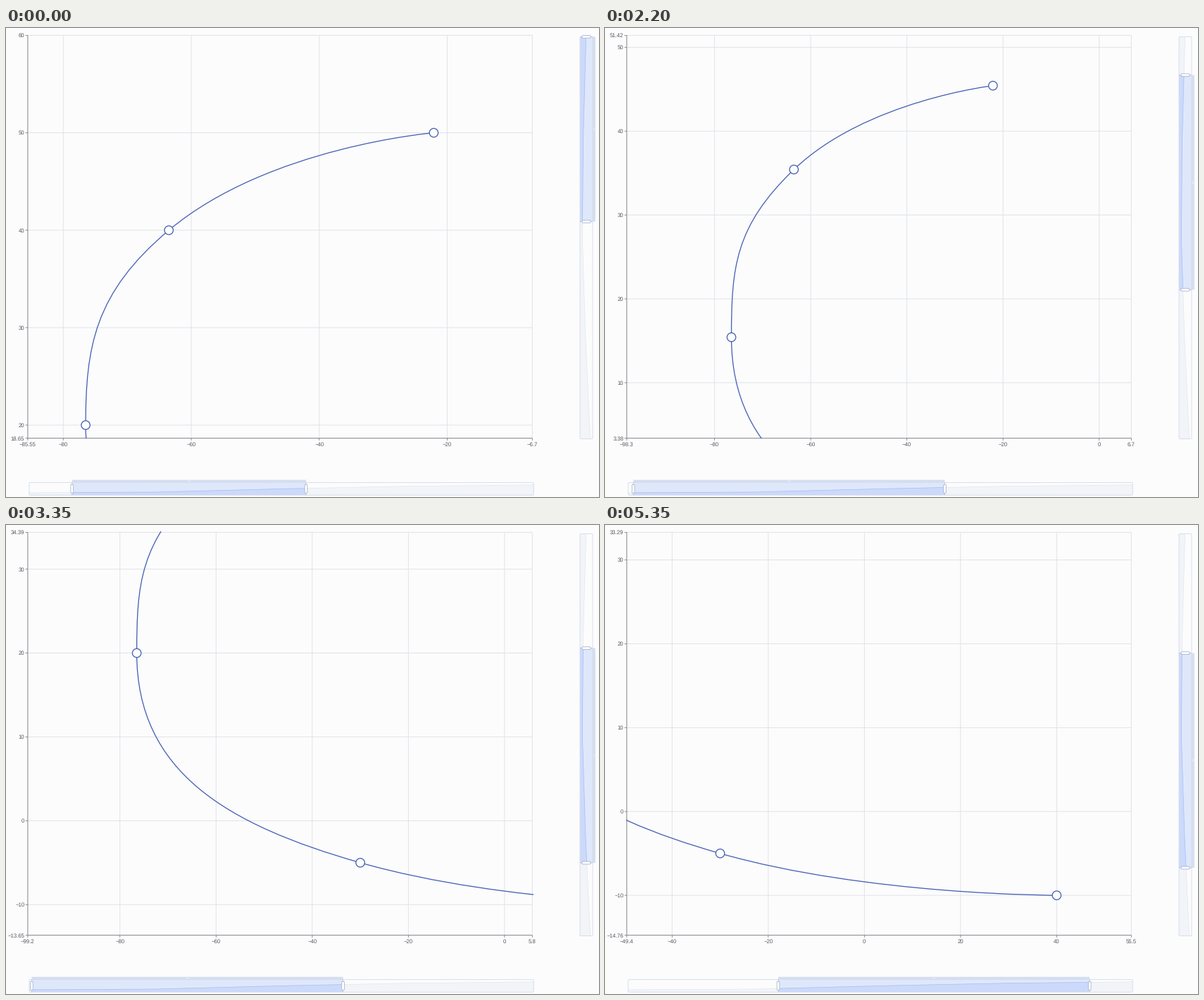
These frames come from a looping animation (842 by 665 pixels, 5400 ms). A matplotlib script:

```python
import numpy as np
import matplotlib.pyplot as plt
from matplotlib.animation import FuncAnimation
from matplotlib.patches import Circle, FancyBboxPatch, PathPatch, Polygon, Rectangle
from matplotlib.path import Path

W, H, DPI = 842, 665, 100
LOOP, STEP = 5400, 50
PX = 72 / DPI
LEFT, RIGHT, TOP, BOTTOM = 30.9, 747.3, 10.4, 581.7
BG, BLUE, GRID, AXIS = "#fcfcfc", "#4660b4", "#dee1e8", "#74767d"
FILL, SHADE, STRIP, EDGE = "#dfe8fb", "#ccd9fa", "#d5deef", "#d2dbee"
POINTS = np.array([(40, -10), (-30, -5), (-76.5, 20), (-63.5, 40), (-22.1, 50)])
X_FULL, Y_FULL = (-100, 70), (-30, 60)
LAG = 100  # the curve follows the axes by this many ms

X_KEYS = [(0, -85.55), (500, -99.17), (1700, -99.17), (2050, -98.27), (2300, -98.27),
          (2700, -98.52), (2800, -98.52), (3250, -99.17), (3750, -99.17),
          (4300, -66.42), (4850, -66.42), (5250, -49.43)]
Y_KEYS = [(0, 60), (1750, 60), (2100, 56), (2200, 51.424), (2700, 49.05), (2800, 49.05),
          (3250, 34.394), (3350, 34.394), (3600, 33.7), (3750, 33.7), (4300, 33.506),
          (4850, 33.506), (5250, 33.288)]

plt.rcParams.update({"font.family": "Liberation Sans", "text.hinting": "none",
                     "path.snap": False})
fig = plt.figure(figsize=(W / DPI, H / DPI), dpi=DPI, facecolor=BG)
ax = fig.add_axes([0, 0, 1, 1])


def track(keys, t):
    return np.interp(t, *zip(*keys))


def window(t):
    lo, top = track(X_KEYS, t), track(Y_KEYS, t)
    width = track([(0, 78.85), (500, 104.95)], t)
    height = track([(0, 41.35), (500, 48.046)], t)
    return (lo, lo + width), (top - height, top)


def scale(v, dom, a, b):
    return a + (v - dom[0]) / (dom[1] - dom[0]) * (b - a)


def line(xs, ys, color, width, z=1):
    ax.plot(xs, ys, color=color, lw=width * PX, zorder=z, solid_capstyle="butt")


def rect(x0, y0, x1, y1, color, z):
    ax.add_patch(Rectangle((x0, y0), x1 - x0, y1 - y0, fc=color, ec="none", zorder=z))


def rounded(x0, y0, x1, y1, r, face, edge, width, z):
    ax.add_patch(FancyBboxPatch((x0, y0), x1 - x0, y1 - y0, fc=face, ec=edge, lw=width * PX,
                                boxstyle=f"round,pad=0,rounding_size={r}", zorder=z))


def label(v, digits):
    s = f"{v:.{digits}f}"
    if "." in s:
        s = s.rstrip("0").rstrip(".")
    return "0" if s == "-0" else s.replace("-", "\u2212")


def text(x, y, s, ha):
    ax.text(x, y + 2.8, s, fontsize=7.8 * PX, color="#55575f", ha=ha, va="baseline", zorder=6)


def ticks(dom, step):
    inner = np.arange(np.ceil(dom[0] / step) * step, dom[1], step)
    return [dom[0], *(v for v in inner if dom[0] + 1e-6 < v < dom[1] - 1e-6), dom[1]]


def draw_axes(xd, yd):
    digits = 2 if xd[1] - xd[0] < 100 else 1
    for v in ticks(xd, 20):
        x = scale(v, xd, LEFT, RIGHT)
        if v != xd[0]:
            line([x, x], [TOP, BOTTOM], GRID, 0.9)
        line([x, x], [BOTTOM, BOTTOM + 3.2], AXIS, 0.8, 5)
        if v in xd or LEFT + 24 < x < RIGHT - 20:
            text(x, 590, label(v, digits), "center")
    for v in ticks(yd, 10):
        y = scale(v, yd, BOTTOM, TOP)
        if v != yd[0]:
            line([LEFT, RIGHT], [y, y], GRID, 0.9)
        line([LEFT - 3.2, LEFT], [y, y], AXIS, 0.8, 5)
        if v in yd or TOP + 8 < y < BOTTOM - 8:
            text(26.3, y, label(v, 2), "right")
    line([LEFT, LEFT], [TOP, BOTTOM], AXIS, 0.9, 5)
    line([LEFT, RIGHT], [BOTTOM, BOTTOM], AXIS, 0.9, 5)


def smooth_path(p, smooth=0.5):
    """Bezier spline whose handles stay inside the box of each segment."""
    verts, codes, start = [p[0]], [Path.MOVETO], p[0]
    for i in range(1, len(p)):
        prev, cur = p[i - 1], p[i]
        end = after = cur
        if i < len(p) - 1:
            nxt = p[i + 1]
            a, b = np.hypot(*(cur - prev)), np.hypot(*(nxt - cur))
            after = cur + (nxt - prev) * smooth * b / (a + b)
            after = np.clip(after, np.minimum(cur, nxt), np.maximum(cur, nxt))
            end = cur - (after - cur) * a / b
            end = np.clip(end, np.minimum(cur, prev), np.maximum(cur, prev))
            after = cur + (cur - end) * b / a
        verts += [start, end, cur]
        codes += [Path.CURVE4] * 3
        start = after
    return Path(verts, codes)


def draw_curve(xd, yd):
    p = np.column_stack([scale(POINTS[:, 0], xd, LEFT, RIGHT),
                         scale(POINTS[:, 1], yd, BOTTOM, TOP)])
    curve = PathPatch(smooth_path(p), fc="none", ec=BLUE, lw=1.3 * PX, zorder=7)
    ax.add_patch(curve)
    curve.set_clip_path(Rectangle((LEFT - 1, TOP - 1.2), RIGHT - LEFT + 2.5, BOTTOM - TOP + 1.2,
                                  transform=ax.transData))
    for x, y in p:
        if LEFT <= x <= RIGHT and TOP <= y <= BOTTOM:
            ax.add_patch(Circle((x, y), 6.2, fc="white", ec=BLUE, lw=1.3 * PX, zorder=8))


def draw_slider(dom, full, values, a, b, base, depth, vertical):
    """Zoom bar running from a to b; depth is signed, away from base."""
    def at(u, v):
        return (v, u) if vertical else (u, v)

    def box(u0, v0, u1, v1):
        (x0, y0), (x1, y1) = at(u0, v0), at(u1, v1)
        return min(x0, x1), min(y0, y1), max(x0, x1), max(y0, y1)

    lo, hi = (scale(v, full, a, b) for v in dom)
    far = base + depth
    sign = np.sign(depth)
    pad = 0.3 * np.ptp(values)
    heights = (values - values.min() + pad) / (np.ptp(values) + 2 * pad)
    us, vs = np.linspace(a, b, len(values)), base + depth * heights
    outline = [at(u, v) for u, v in zip(us, vs)]
    area = outline + [at(b, base), at(a, base)]
    chosen = Rectangle((0, 0), 1, 1, transform=ax.transData)
    x0, y0, x1, y1 = box(lo, base, hi, far)
    chosen.set_bounds(x0, y0, x1 - x0, y1 - y0)

    ax.add_patch(Polygon(area, fc="#f2f4f8", ec="none", zorder=1))
    line(*zip(*outline), "#dfe4ee", 0.6, 2)
    rect(x0, y0, x1, y1, FILL, 3)
    shade = Polygon(area, fc=SHADE, ec="none", zorder=4)
    edge = PathPatch(Path(outline), fc="none", ec="#a5bdf5", lw=0.7 * PX, zorder=5)
    for part in (shade, edge):
        ax.add_patch(part)
        part.set_clip_path(chosen)
    rounded(*box(a, base, b, far), 1.8, "none", EDGE, 0.9, 6)
    rect(*box(lo, far - 0.3 * sign, hi, far + 3.8 * sign), STRIP, 6)

    mid, grip = (lo + hi) / 2, far + 1.8 * sign
    rect(*box(mid - 2, grip - 0.5, mid + 2, grip + 0.5), "#eef2f8", 7)
    c = base + depth / 2
    for u in (lo, hi):
        line(*zip(at(u, base), at(u, far)), "#b3bfd8", 0.8, 7)
        rounded(*box(u - 1.9, c - 6, u + 1.9, c + 6), 1.2, "white", "#acb8d1", 0.9, 8)


def draw(i):
    ax.clear()
    ax.set(xlim=(0, W), ylim=(H, 0))
    ax.axis("off")
    t = i * STEP
    xd, yd = window(t)
    draw_axes(xd, yd)
    draw_curve(*window(max(t - LAG, 0)))
    draw_slider(xd, X_FULL, POINTS[:, 1], 32.9, 749.2, 662.3, -17.8, False)
    draw_slider(yd, Y_FULL, POINTS[:, 0], 582.6, 12.4, 815, 18, True)
    return []


anim = FuncAnimation(fig, draw, frames=LOOP // STEP, init_func=lambda: [],
                     interval=STEP, repeat=True, repeat_delay=0)
plt.show()
```
